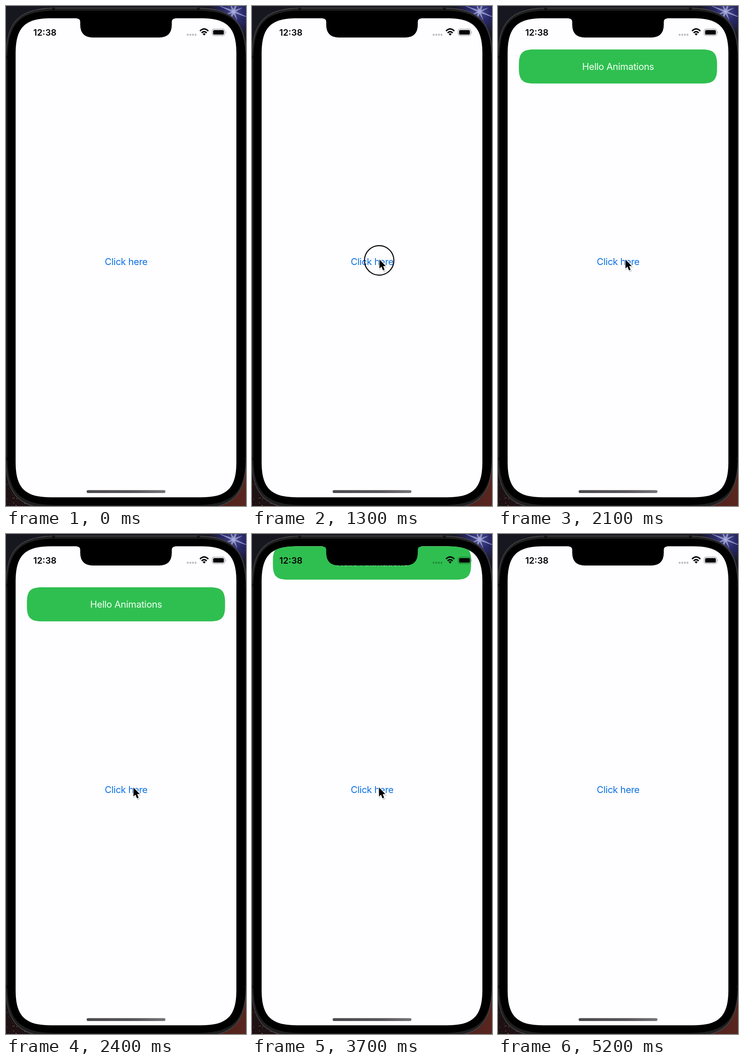
Animation, 519 px wide and 1079 px high, one loop 5300 ms. Source, as an HTML page:

```html
<!DOCTYPE html>
<html lang="en">
<head>
<meta charset="utf-8">
<title>Banner spring</title>
<style>
  html, body { margin: 0; width: 100%; height: 100%; overflow: hidden; background: #17171f; }
  svg { display: block; width: 519px; height: 1079px; }
  text { font-family: Inter, Roboto, sans-serif; font-size: 20.2px; letter-spacing: -.3px; text-anchor: middle; }
  .time { font-size: 19px; font-weight: 600; letter-spacing: 0; text-anchor: start; }
</style>
</head>
<body>
<svg viewBox="0 0 519 1079">
  <defs>
    <radialGradient id="nebula"><stop stop-color="#4a4c8c"/><stop offset=".4" stop-color="#29296a"/><stop offset="1" stop-color="#17171f"/></radialGradient>
    <linearGradient id="ember"><stop stop-color="#1c1113"/><stop offset=".6" stop-color="#2a1516"/><stop offset="1" stop-color="#5a261f"/></linearGradient>
    <linearGradient id="bar" x2="1"><stop stop-color="#4c4a4e"/><stop offset=".6" stop-color="#58565a"/><stop offset="1" stop-color="#77757a"/></linearGradient>
    <clipPath id="clip"><path id="clipShape"/></clipPath>
  </defs>

  <rect width="519" height="1079" fill="#17171f"/>
  <circle cx="492" cy="12" r="56" fill="url(#nebula)"/>
  <g id="rays" fill="#a9aede"></g>
  <rect y="960" width="519" height="119" fill="url(#ember)"/>
  <g id="dust" fill="#a5654c"></g>

  <path id="rim" fill="#4b4b4e"/>
  <path id="frame" fill="#1f1f20"/>
  <path id="bezel"/>
  <path d="M0 107h3v6H0zM0 974h3v6H0zM516 107h3v6h-3zM516 974h3v6h-3zM100 4h6v5h-6zM413 4h6v5h-6z" fill="#111"/>
  <path id="screen" fill="#fefdff"/>

  <g clip-path="url(#clip)">
    <g id="banner">
      <path id="pill" fill="#2fbf50"/>
      <text x="259.7" y="44.4" fill="#f4fff6">Hello Animations</text>
    </g>
  </g>
  <path d="M153 25V27Q160 27 160.500 34V41Q161 68 188 68H331Q358 68 358.500 41V34Q359 27 366 27V25z"/>

  <text class="time" x="59" y="64">12:38</text>
  <g fill-opacity=".25"><circle cx="392.800" cy="62" r="2.200"/><circle cx="398.600" cy="62" r="2.200"/><circle cx="404.200" cy="62" r="2.200"/><circle cx="409.800" cy="62" r="2.200"/></g>
  <path d="M419.500 54Q428.500 45 437.500 54M423 58Q428.500 52.600 434 58" fill="none" stroke="#000" stroke-width="3"/>
  <path d="M425.200 60.300Q428.500 57.500 431.800 60.300L428.500 63.800z"/>
  <rect x="445.800" y="49.800" width="27.400" height="14" rx="4.300" fill="none" stroke="#000" stroke-opacity=".4" stroke-width="1.200"/>
  <rect x="447.900" y="51.900" width="23.200" height="9.900" rx="2.600"/>
  <path d="M474.700 54.500q1.800 2.300 0 4.600z" fill-opacity=".45"/>

  <text id="button" x="259.8" y="559.2" fill="#0a70e4">Click here</text>
  <rect x="174.400" y="1044.800" width="170.400" height="6.100" rx="3" fill="url(#bar)"/>

  <g id="cursor">
    <circle id="ring" cy="2" r="31.800" fill="none" stroke="#000" stroke-width="2.200"/>
    <path d="M0 0V23.500L6 19.500L9.500 27.500L15 25L11.500 17.500H18z" fill-opacity=".16"/>
    <path d="M.6 0V19.600L5 15.600L8.200 23.400L11.800 21.900L8.600 14.300H14.300z" stroke="#fff" stroke-width="2.800" paint-order="stroke"/>
  </g>
</svg>
<script>
const LOOP = 5300, STEP = 100;
const REST_Y = 108.5, TRAVEL = 344;
const PRESSES = [[1300, 1900], [2940, 3629]];
const $ = id => document.getElementById(id);
const clamp = v => Math.min(1, Math.max(0, v));
const ease = v => v * v * (3 - 2 * v);

// Rectangle with continuous corners: a is the corner's reach, k its control offset.
function squircle(x, y, w, h, a, k) {
  const r = x + w, b = y + h;
  return `M${x + a} ${y}H${r - a}C${r - k} ${y} ${r} ${y + k} ${r} ${y + a}` +
    `V${b - a}C${r} ${b - k} ${r - k} ${b} ${r - a} ${b}` +
    `H${x + a}C${x + k} ${b} ${x} ${b - k} ${x} ${b - a}` +
    `V${y + a}C${x} ${y + k} ${x + k} ${y} ${x + a} ${y}z`;
}
const shape = (id, ...box) => $(id).setAttribute('d', squircle(...box));
const SCREEN = [20.8, 26.6, 477.4, 1033.6, 76, 20];
shape('rim', -1, 3.5, 521, 1082, 112, 29);
shape('frame', 0, 5, 519, 1079, 111, 28.5);
shape('bezel', 3, 10, 515, 1067, 106, 27);
shape('screen', ...SCREEN);
shape('clipShape', ...SCREEN);
shape('pill', 45.2, 0, 428.5, 73.4, 32, 8);

for (let i = 0; i < 8; i++)
  $('rays').innerHTML += `<path d="M0 -2.500L${i % 2 ? 22 : 38} 0L0 2.500z" transform="translate(492 12) rotate(${i * 45 + 22})" opacity=".75"/>`;
let seed = 7;
const random = () => (seed = seed * 16807 % 2147483647) / 2147483647;
for (let i = 0; i < 60; i++)
  $('dust').innerHTML += `<circle cx="${random() * 70}" cy="${1015 + random() * 64}" r="${.4 + random() * .6}"/>`;

// Unit step response of a spring with response 0.55 s and damping fraction 0.5.
function spring(ms) {
  if (ms <= 0) return 0;
  const s = ms / 1000, omega = 2 * Math.PI / .55, decay = omega * .5, freq = omega * Math.sqrt(.75);
  return 1 - Math.exp(-decay * s) * (Math.cos(freq * s) + decay / freq * Math.sin(freq * s));
}

function cursorAt(t) {
  const enter = 1 - (1 - clamp((t - 50) / 1100)) ** 3;
  const leave = ease(clamp((t - 4000) / 1150));
  const nudge = t >= 2600 ? 1 : 0;
  return [275 + 60 * (1 - enter) - nudge + 75 * leave, 547 + 540 * (1 - enter) + 545 * leave];
}

function draw(t) {
  const shown = spring(t - PRESSES[0][1]) - spring(t - PRESSES[1][1]);
  $('banner').setAttribute('transform', `translate(0 ${REST_Y - TRAVEL * (1 - shown)})`);

  const pressed = PRESSES.some(([down, up]) => t >= down && t < up);
  let dim = 0;
  for (const [down, up] of PRESSES)
    dim += clamp((t - down) / 200) * (1 - clamp((t - up) / 60));
  $('button').setAttribute('opacity', 1 - .8 * dim);

  $('cursor').setAttribute('transform', `translate(${cursorAt(t)})`);
  $('cursor').setAttribute('visibility', t >= 100 && t < 5200 ? 'visible' : 'hidden');
  $('ring').setAttribute('opacity', pressed ? 1 : 0);
}

const start = performance.now();
function tick() {
  const t = (performance.now() - start) % LOOP;
  draw(Math.floor(t / STEP) * STEP);
  requestAnimationFrame(tick);
}
tick();
</script>
</body>
</html>
```
